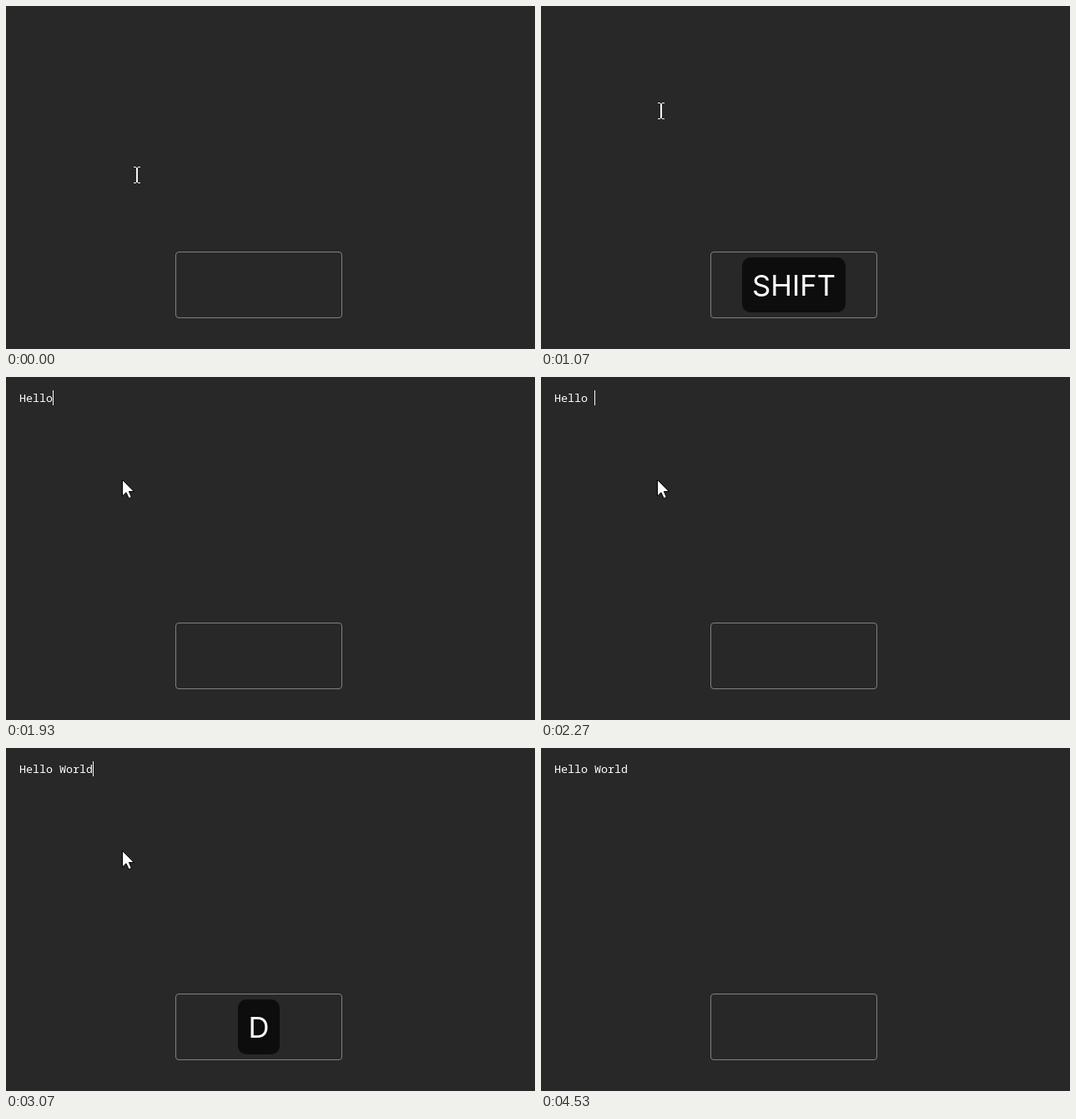
An HTML page that plays this animation: 634 px wide and 412 px high, repeating every 7 s.

```html
<!DOCTYPE html>
<html lang="en">
<head>
<meta charset="utf-8">
<title>Typing with key display</title>
<style>
  html, body {
    margin: 0;
    width: 100%;
    height: 100%;
    overflow: hidden;
    background: #282828;
  }
  #stage {
    position: relative;
    width: 634px;
    height: 412px;
    overflow: hidden;
    background: #282828;
    color: #fff;
  }
  #line {
    position: absolute;
    left: 16px;
    top: 16px;
    height: 18px;
    white-space: pre;
    font: 13.333px/18px "Noto Sans Mono", monospace;
  }
  #caret {
    position: absolute;
    top: 16px;
    width: 1px;
    height: 18px;
    background: #f8f8f0;
  }
  #keys {
    position: absolute;
    left: 303px;
    top: 295px;
    width: 200px;
    height: 80px;
    transform: translateX(-50%);
    box-sizing: border-box;
    border: 1px solid #808080;
    border-radius: 4px;
    display: flex;
    justify-content: center;
    align-items: center;
    gap: 16px;
  }
  #keys.wide { width: 212px; }
  .key {
    flex: none;
    padding: 0 12px;
    border-radius: 10px;
    background: #0d0d0d;
    font: 34.667px/66px Inter, sans-serif;
  }
  svg { position: absolute; left: 0; top: 0; overflow: visible; }
  [hidden] { display: none; }
</style>
</head>
<body>
<div id="stage">
  <div id="line"></div>
  <div id="caret"></div>
  <div id="keys"></div>
  <svg id="beam" width="8" height="20" fill="#f4f4f4" shape-rendering="crispEdges">
    <path d="M0 0h3v1h2v-1h3v1h-3v18h3v1h-3v-1h-2v1h-3v-1h3v-18h-3z"/>
  </svg>
  <svg id="arrow" width="16" height="24">
    <path d="M.5 .5V20L5 15.8L8.2 22.8L11.4 21.3L8.4 14.5H14.3Z" fill="#fff" stroke="#000"/>
  </svg>
</div>
<script>
const LOOP = 7000, CHAR = 8, LEFT = 16;
const $ = id => document.getElementById(id);
const line = $('line'), caret = $('caret'), keys = $('keys'), beam = $('beam'), arrow = $('arrow');

// Each entry changes part of the state from its time on.
const events = [
  [0, { text: '', keys: '', caret: false, pointer: 'beam' }],
  [470, { caret: true }],
  [870, { caret: false }],
  [1070, { keys: 'SHIFT' }],
  [1130, { text: 'H', keys: 'SHIFT H', caret: true, pointer: 'arrow' }],
  [1200, { text: 'He', keys: 'E' }],
  [1400, { text: 'Hel', keys: 'L' }],
  [1600, { text: 'Hell', keys: '' }],
  [1800, { text: 'Hello', keys: 'O' }],
  [1930, { keys: '' }],
  [2070, { text: 'Hello ', keys: 'SPACE' }],
  [2270, { keys: '' }],
  [2330, { keys: 'SHIFT' }],
  [2400, { text: 'Hello W', keys: 'SHIFT W' }],
  [2600, { text: 'Hello Wo', keys: 'O' }],
  [2730, { text: 'Hello Wor', keys: '' }],
  [2930, { text: 'Hello Worl', keys: 'L' }],
  [3070, { text: 'Hello World', keys: 'D' }],
  [3130, { keys: '' }],
  [3670, { caret: false, pointer: 'beam' }],
  [3730, { pointer: '' }],
  [4130, { caret: true }],
  [4530, { caret: false }]
];

// The pointer is sampled in hard steps along an eased path.
const moves = [70, 130, 200, 270, 330, 400];

function beamPlace(t) {
  if (t >= 3670) return [11, 188];
  const p = moves.filter(m => m <= t).length / moves.length;
  const e = p * p * (3 - 2 * p);
  return [Math.round(153 - 13 * e), Math.round(193 - 77 * e)];
}

let shownKeys = null;

function showKeys(names) {
  if (names === shownKeys) return;
  shownKeys = names;
  keys.classList.toggle('wide', names === 'SHIFT W');
  keys.replaceChildren(...names.split(' ').filter(Boolean).map(name => {
    const key = document.createElement('span');
    key.className = 'key';
    key.textContent = name;
    return key;
  }));
}

function toggle(el, on) {
  el.style.display = on ? 'block' : 'none';
}

function draw(t) {
  const state = Object.assign({}, ...events.filter(e => e[0] <= t).map(e => e[1]));
  if (line.textContent !== state.text) line.textContent = state.text;
  caret.style.left = LEFT + CHAR * state.text.length + 'px';
  toggle(caret, state.caret);
  showKeys(state.keys);
  toggle(beam, state.pointer === 'beam');
  toggle(arrow, state.pointer === 'arrow');
  const [x, y] = beamPlace(t);
  beam.style.transform = `translate(${x}px, ${y}px)`;
  arrow.style.transform = 'translate(139px, 123px)';
}

const start = performance.now();
function tick() {
  draw((performance.now() - start) % LOOP);
  requestAnimationFrame(tick);
}
draw(0);
requestAnimationFrame(tick);
</script>
</body>
</html>
```
